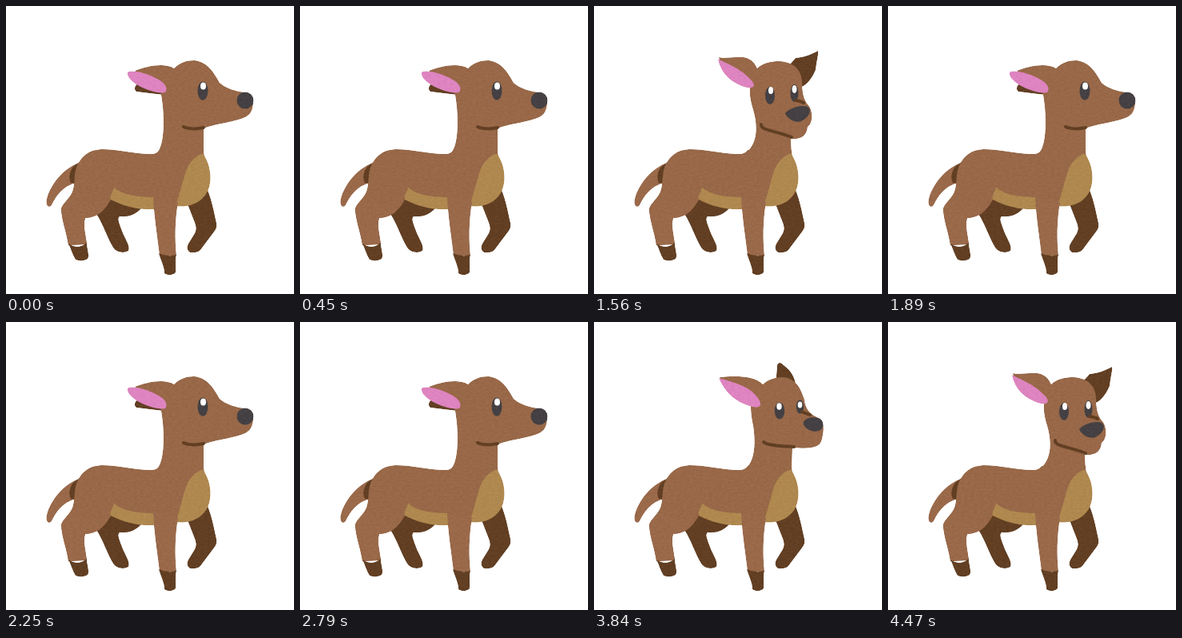
These frames come from a looping animation (360x360 px, 4.5 s). An HTML page:

```html
<!DOCTYPE html>
<html lang="en">
<head>
<meta charset="utf-8">
<title>Fawn turning its head</title>
<style>
  html, body { margin: 0; width: 100%; height: 100%; overflow: hidden; background: #fff; }
  svg { display: block; width: 100vw; height: 100vh; }
  .coat { fill: #986848; }
  .limb { fill: #9a694a; }
  .dark { fill: #623f23; }
  .belly { fill: #af884f; }
  .pink { fill: #de84c0; }
  .black { fill: #444043; }
  .white { fill: #fff; }
  .line { fill: none; stroke: #623f23; stroke-width: 4; stroke-linecap: round; }
</style>
</head>
<body>
<svg viewBox="0 0 360 360">
  <filter id="paper" filterUnits="userSpaceOnUse" x="0" y="0" width="360" height="360" color-interpolation-filters="sRGB">
    <feTurbulence id="grain" type="fractalNoise" baseFrequency=".25 .45" numOctaves="2"/>
    <feColorMatrix values="1 0 0 0 0  1 0 0 0 0  1 0 0 0 0  0 0 0 0 1" result="gray"/>
    <feComposite in="SourceGraphic" in2="gray" operator="arithmetic" k2="1" k3=".06" k4="-.03"/>
    <feComposite in2="SourceGraphic" operator="in"/>
  </filter>
  <g filter="url(#paper)">
    <!-- far legs and tail -->
    <path class="dark" d="M113 260C122 274 127 291 134 302C139 309 148 309 153 306C156 300 148 290 145 281C141 270 139 266 142 263C152 264 161 262 169 253L130 238Z"/>
    <path class="dark" d="M252 230C257 242 260 257 263 271Q264 277 261 281L243 305Q239 309 230 308Q224 304 228 297L236 284Q239 278 236 271L227 248Z"/>
    <path class="limb" d="M91 196C74 202 56 221 51 241C49 248 53 254 57 249C63 237 70 226 87 221Z"/>
    <path class="dark" d="M92 195L84 201C79 208 78 215 81 221L88 222Z"/>
    <g id="backEar"></g>
    <!-- body and near legs -->
    <path class="coat" d="M192 180C188 185 184 185 178 185C158 184 140 179 119 179C103 180 96 187 90 197C84 209 87 220 83 232C80 240 72 245 69 253C69 267 76 283 78 299L101 298C100 287 96 275 99 265C113 265 123 257 131 242L185 253L214 250C232 251 248 233 250 216C252 204 248 193 247 180Z"/>
    <path class="limb" d="M82 240C75 244 69 249 69 255C70 270 76 284 78 299L101 298C100 287 96 275 99 265C108 264 118 260 122 254Z"/>
    <path class="dark" d="M78 297Q90 305 101 296C101 303 105 313 102 316C98 319 91 319 87 317C83 311 81 303 78 297Z"/>
    <path class="belly" d="M135 226C142 235 162 239 185 239V254C167 255 148 251 131 242C129 236 135 232 135 226Z"/>
    <path class="belly" d="M246 184C236 188 229 195 225 206C221 218 217 236 212 250C222 252 237 249 245 241C254 233 257 220 255 207C254 198 250 190 246 184Z"/>
    <path class="limb" d="M184 239C185 263 189 287 192 312H213C211 291 211 270 215 245Z"/>
    <path class="dark" d="M191 309Q202 314 213 311C211 319 213 328 212 333C209 337 201 337 198 334C198 326 193 317 191 309Z"/>
    <g id="turnedHead"></g>
    <!-- head in profile -->
    <g id="profile">
      <path class="dark" d="M167 96C161 98 159 104 163 107C174 108 184 110 197 111L193 100Z"/>
      <path class="coat" d="M161 81C174 76 197 70 210 78C217 71 225 68 235 68C250 69 259 81 267 96C275 103 287 107 300 108L309 122C308 134 303 138 294 141C279 146 259 148 247 153V185H187C199 178 199 135 193 106Z"/>
      <path class="pink" d="M152 83C157 79 176 84 189 91C199 96 203 103 199 108C191 110 175 105 163 98C155 93 151 87 152 83Z"/>
      <path class="line" d="M222 151C228 154 239 154 247 152"/>
      <ellipse class="black" cx="246" cy="106" rx="6.5" ry="11.5"/>
      <ellipse class="white" cx="246.5" cy="100" rx="3.5" ry="4.5"/>
      <circle class="black" cx="299" cy="118" r="10.5"/>
    </g>
  </g>
</svg>
<script>
const LOOP = 4500;
const el = id => document.getElementById(id);
const backEar = el('backEar'), turnedHead = el('turnedHead'), profile = el('profile'), grain = el('grain');

// class, three-quarter pose, front pose
const earPart = ['dark',
  'M227 80L229 54C230 50 234 50 237 54C244 59 250 66 252 77C250 85 246 88 242 88Z',
  'M244 74C252 65 267 64 277 57C280 56 281 59 279 65C277 80 271 94 263 101C258 101 255 100 250 98Z'];
const headParts = [
  ['coat',
   'M157 69C170 68 199 65 211 78C217 72 226 69 237 69C253 71 259 84 263 97C264 109 271 116 281 120C288 125 288 134 285 146C283 157 273 159 248 157L247 185H187C202 176 202 150 199 130C197 120 196 114 196 104C181 100 164 86 157 69Z',
   'M156 64C172 68 194 55 204 78C211 71 221 69 232 69C249 70 259 79 260 94C260 107 262 118 268 124C274 131 274 146 267 151C266 163 258 167 246 166L247 185H187C205 175 205 150 199 130C196 120 194 112 195 101C181 98 160 85 156 64Z'],
  ['pink',
   'M156 70C172 75 194 79 205 95C211 104 208 108 199 106C179 102 164 89 156 70Z',
   'M155 66C163 71 181 76 196 92C203 100 200 103 191 102C172 97 158 84 155 66Z'],
  ['line', 'M212 150C218 155 236 155 250 156', 'M209 148C208 156 229 156 247 164'],
  ['black', oval(232, 111, 6.3, 10.5), oval(220, 112, 6, 11)],
  ['white', oval(231.5, 105.5, 3.2, 4.2), oval(221, 105.5, 3, 4.5)],
  ['black', oval(257.5, 106, 4.8, 8.5), oval(250.5, 109, 5, 11)],
  ['white', oval(257.5, 103.5, 2.8, 4), oval(250.5, 104, 3, 5)],
  ['line', 'M260 112C263 114 267 115 270 116', 'M252 118C256 118 259 120 262 121'],
  ['black',
   'M262 125C265 119 275 118 283 121C288 125 288 133 281 136C273 139 260 132 262 125Z',
   'M239 134C244 128 258 123 267 126C273 130 269 139 259 144C251 147 241 140 239 134Z']
];

function oval(x, y, rx, ry) {
  return `M${x - rx} ${y}A${rx} ${ry} 0 1 1 ${x + rx} ${y}A${rx} ${ry} 0 1 1 ${x - rx} ${y}Z`;
}

function addPart(parent, [cls, from, to]) {
  const path = document.createElementNS('http://www.w3.org/2000/svg', 'path');
  path.setAttribute('class', cls);
  parent.append(path);
  const ends = to.match(/[\d.]+/g);
  return p => {
    let i = 0;
    path.setAttribute('d', from.replace(/[\d.]+/g, n => +n + (ends[i++] - n) * p));
  };
}

const setEar = addPart(backEar, earPart);
const setHead = headParts.map(part => addPart(turnedHead, part));

function ease(t, start, end) {
  const x = Math.min(1, Math.max(0, (t - start) / (end - start)));
  return x * x * (3 - 2 * x);
}

function draw(now) {
  const t = now % LOOP;
  const isProfile = t < 505 || (t >= 1765 && t < 3765);
  const turn = ease(t, 550, 690) - ease(t, 1580, 1720) + ease(t, 3840, 3980);
  profile.style.display = isProfile ? '' : 'none';
  backEar.style.display = turnedHead.style.display = isProfile ? 'none' : '';
  setEar(turn);
  backEar.setAttribute('transform', `translate(0 ${-5 * Math.sin(Math.PI * turn)})`);
  setHead.forEach(set => set(turn));
  grain.setAttribute('seed', Math.floor(t / 30));
  requestAnimationFrame(draw);
}
requestAnimationFrame(draw);
</script>
</body>
</html>
```
